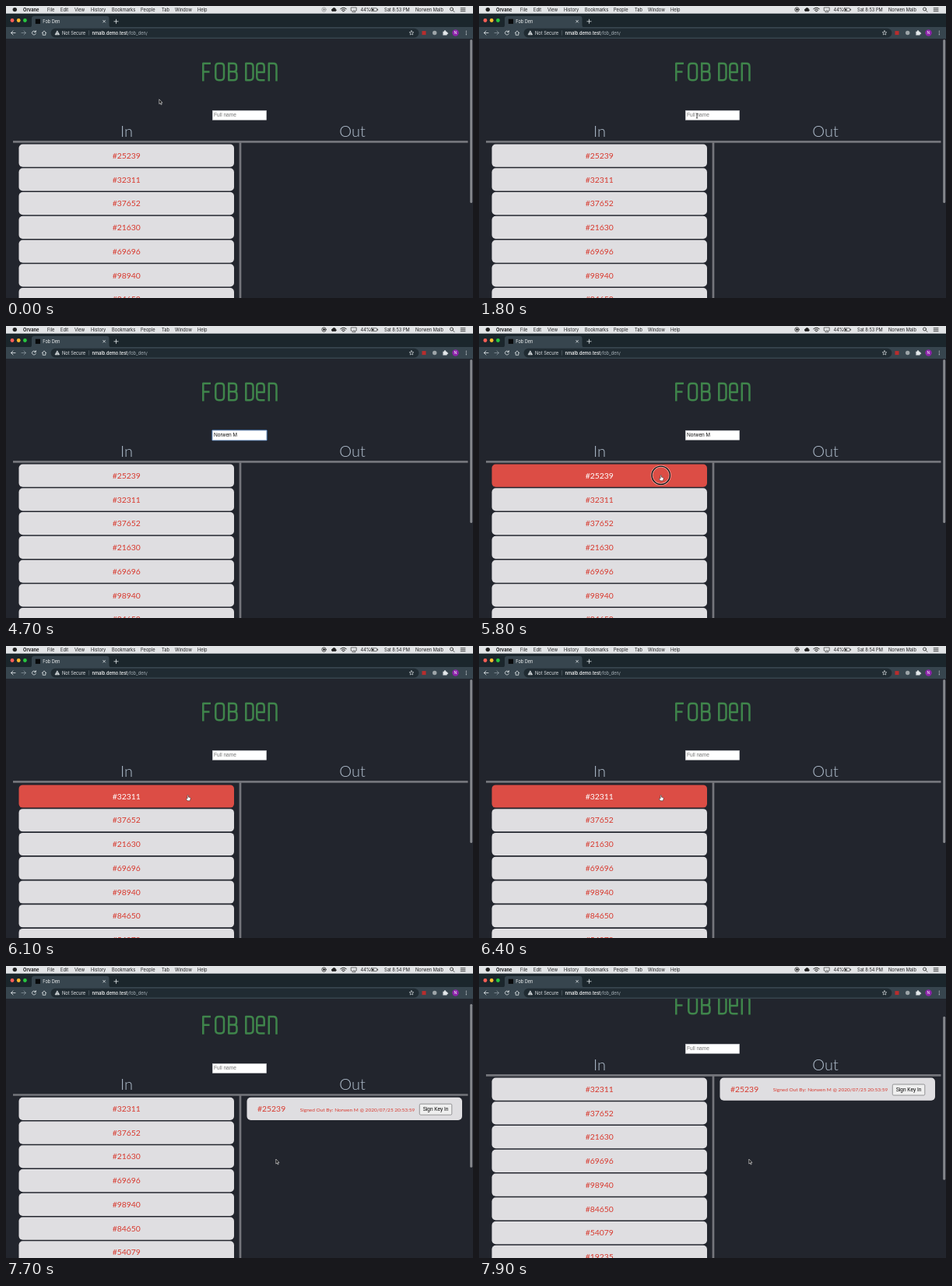
Recreate the animation shown at these times as an HTML page. Size 600 by 375 pixels, loop 8000 ms.

```html
<!DOCTYPE html>
<html lang="en">
<head>
<meta charset="utf-8">
<title>Fob Den</title>
<style>
html, body { margin: 0; width: 100%; height: 100%; overflow: hidden; background: #22252d; }
svg { display: block; width: 100vw; height: 100vh; }
text { white-space: pre; }
.ui { font: 5.7px Inter, sans-serif; }
.lato { font-family: Lato, sans-serif; }
.form { font-family: "Liberation Sans", Arial, sans-serif; }
.key { font-size: 10.4px; fill: #d8392e; }
.line { fill: none; stroke: currentColor; stroke-linecap: round; stroke-linejoin: round; }
</style>
</head>
<body>
<svg viewBox="0 0 600 375" xmlns="http://www.w3.org/2000/svg">
  <defs><clipPath id="view"><rect y="42" width="600" height="333"/></clipPath></defs>
  <rect width="600" height="375" fill="#22252d"/>

  <g clip-path="url(#view)">
    <g id="page">
      <g role="img" aria-label="Fob Den" class="line" color="#3f854b" stroke-width="2.5" style="stroke-linecap:butt">
        <path d="M253.3 96.5V73.8H263M253.3 84.5H261.5"/>
        <path d="M269.3 78Q269.3 73.8 273.3 73.8H276Q280 73.8 280 78V91Q280 95.2 276 95.2H273.3Q269.3 95.2 269.3 91Z"/>
        <path d="M286.3 73.8H292Q296 73.8 296 77.5V81Q296 84.3 292.5 84.3H286.3M292.5 84.3Q296.5 84.3 296.5 88V91.5Q296.5 95.2 292.5 95.2H286.3V72.6"/>
        <path d="M308.3 73.8H313.5Q317.5 73.8 317.5 78V91Q317.5 95.2 313.5 95.2H308.3Z"/>
        <path d="M332.5 95.2H326Q322.3 95.2 322.3 91V78Q322.3 73.8 326 73.8H328Q331.7 73.8 331.7 78V85H322.3"/>
        <path d="M337.8 96.5V73.8H343.5Q347.5 73.8 347.5 78V96.5"/>
      </g>
      <g class="form" font-size="6.6">
        <rect id="focus" x="264.5" y="133.4" width="71" height="13.8" rx="1" fill="#5b9bea"/>
        <rect x="265.3" y="134.2" width="69.4" height="12.2" fill="#fff" stroke="#b9bbc0" stroke-width=".5"/>
        <text id="entry" x="267" y="142.3"></text>
        <rect id="caret" y="136.5" width=".6" height="7.4"/>
      </g>
      <g class="lato" font-size="20" font-weight="300" fill="#b3c1d0" text-anchor="middle">
        <text x="155" y="167.5">In</text><text x="445" y="167.5">Out</text>
      </g>
      <path d="M9 174.3H593.5M301 174V470" stroke="#74757b" stroke-width="2.7"/>
      <g id="cards"></g>
      <g id="out" class="lato">
        <rect x="309.5" y="177.5" width="276.5" height="29.2" rx="5" fill="#dfdee1"/>
        <text class="key" x="323" y="195.8">#25239</text>
        <text x="451.5" y="195.4" font-size="6.5" fill="#d8392e" text-anchor="middle">Signed Out By: Norwen M @ 2020/07/25 20:53:59</text>
        <rect x="531.3" y="186" width="41.5" height="14" rx="1.5" fill="#efefef" stroke="#6f6f72" stroke-width=".7"/>
        <text class="form" x="552" y="195.3" font-size="6.4" text-anchor="middle">Sign Key In</text>
      </g>
    </g>
    <rect id="thumb" x="596.2" y="43" width="3" height="210" rx="1.5" fill="#85878c"/>
  </g>

  <g class="ui">
    <rect width="600" height="10" fill="#e2e4e6"/>
    <circle cx="11.3" cy="4.6" r="2.7" fill="#222"/>
    <g id="menu" fill="#1c1c1e"></g>
    <g class="line" color="#222" stroke-width=".8">
      <g id="record"><circle cx="408.5" cy="4.6" r="2.7"/><circle cx="408.5" cy="4.6" r="1" fill="currentColor"/></g>
      <path d="M419.3 6.5H423.6A1.4 1.4 0 0 0 423.6 4.2A2.2 2.2 0 0 0 419.5 3.8A1.4 1.4 0 0 0 419.3 6.5Z" fill="currentColor"/>
      <path d="M429.8 3.7Q433.5 .7 437.2 3.7M431.2 5.2Q433.5 3.3 435.8 5.2M432.7 6.7H434.3" stroke-width="1"/>
      <path d="M444.5 6H443.2V2H450.2V6H448.9M446.7 5.6L444.8 7.8H448.6Z" stroke-width=".6"/>
      <rect x="468.8" y="2.8" width="7.8" height="3.8" rx=".8" stroke-width=".6"/>
      <path d="M470 4.7H472.5" stroke-width="2" stroke-linecap="butt"/>
      <path d="M477.6 4.2V5.2"/>
      <circle cx="572.5" cy="4" r="2"/><path d="M574 5.5L576 7.5"/>
      <path d="M584.2 2.7H590M584.2 4.7H590M584.2 6.7H590"/>
    </g>

    <rect y="9.7" width="600" height="18" fill="#1b262c"/>
    <circle cx="8" cy="18.5" r="2.4" fill="#ff5f57"/>
    <circle cx="16.2" cy="18.5" r="2.4" fill="#febc2e"/>
    <circle cx="24.4" cy="18.5" r="2.4" fill="#28c840"/>
    <path d="M30 27.5Q33 27.5 33 24.5V16Q33 13 36 13H129.500Q132.500 13 132.500 16V24.500Q132.500 27.500 135.500 27.500Z" fill="#37454e"/>
    <rect x="37.8" y="16.7" width="6.2" height="6.2" fill="#08090a"/>
    <text x="47.3" y="21.9" fill="#f2f4f5" font-size="5.6">Fob Den</text>
    <rect y="27" width="600" height="15" fill="#37454e"/>
    <rect x="57.500" y="28.700" width="473" height="11.700" rx="5.850" fill="#202b32"/>
    <g class="line" color="#e3e7ea" stroke-width=".8">
      <path d="M124.7 18.300L127.500 21.100M127.500 18.300L124.700 21.100M138.900 19.800H144.100M141.500 17.200V22.400"/>
      <path d="M12 34.500H6.500M9 32L6.500 34.500L9 37"/>
      <path d="M20 34.500H25.500M23 32L25.500 34.500L23 37" color="#87939b"/>
      <path d="M38 33A2.500 2.500 0 1 0 38.300 35.500M38.400 31.600V33.500H36.500"/>
      <path d="M46.200 34.700L49 31.900L51.800 34.700M47.200 34.500V37.300H50.800V34.500"/>
      <path d="M66 32.200L68.500 36.800H63.500Z" fill="currentColor"/>
      <path d="M66 33.800V35.200M66 36.300V36.400" stroke="#202b32" stroke-width=".6"/>
      <path d="M106.500 31.800V37.200" stroke="#6b777f" stroke-width=".5"/>
      <path id="star" stroke-width=".6"/>
      <path d="M561.700 33H563.100A1 1 0 1 1 564.900 33H566.300V34.300A1 1 0 1 1 566.300 36V37.300H561.700Z" fill="currentColor" stroke-width=".4"/>
      <path d="M591.300 32.300V32.350M591.300 34.500V34.550M591.300 36.700V36.750" stroke-width="1.200"/>
    </g>
    <text x="72" y="36.600" fill="#e3e7ea">Not Secure</text>
    <text x="110.500" y="36.600" fill="#fff" font-weight="500">nmalb.demo.test<tspan fill="#a6b0b7" font-weight="400">/fob_den/</tspan></text>
    <rect x="534.500" y="32.100" width="5" height="5" fill="#b92d2d"/>
    <circle cx="550.700" cy="34.500" r="2.700" fill="#9da4a8"/>
    <circle cx="577.500" cy="34.500" r="4.200" fill="#8d24aa"/>
    <text x="577.500" y="36.300" fill="#fff" font-size="5" text-anchor="middle">N</text>
  </g>

  <g id="press" fill="none">
    <circle r="11.7" stroke="#fff" stroke-opacity=".55" stroke-width="2.8"/>
    <circle r="11.7" stroke="#111" stroke-width="1.4"/>
  </g>
  <g id="pointer" stroke-linejoin="round">
    <path id="arrow" d="M0 0V6L1.400 4.800L2.400 7L3.400 6.500L2.400 4.400H4.200Z" fill="#111" stroke="#eee" stroke-width=".6"/>
    <path id="beam" d="M-1.200 -3.200Q0 -3.200 0 -2.400V2.400Q0 3.200 -1.200 3.200M1.200 -3.200Q0 -3.200 0 -2.400M0 2.400Q0 3.200 1.200 3.200" fill="none" stroke="#111" stroke-width=".7"/>
    <path id="hand" d="M-.6 0Q0 -.6 .6 0V2.200L3 2.900Q3.700 3.200 3.400 4.300L2.700 7H-.6L-2.400 4.400Q-2.200 3.500 -.6 4.200Z" fill="#fff" stroke="#222" stroke-width=".5"/>
  </g>
</svg>
<script>
const LOOP = 8000, STEP = 100;
const NAME = 'Norwen M';
const KEYS = [25239, 32311, 37652, 21630, 69696, 98940, 84650, 54079, 19235];
const CARD = { left: 16.5, top: 177.5, width: 276.5, height: 29.2, pitch: 30.75 };
const T = { click: 2100, type: 2700, perKey: 220, wake: 4800, press: 5700, sign: 6000, out: 6500, scroll: 7600 };
// time, x, y of the pointer's resting points
const PATH = [[0, 196.8, 119.8], [700, 196.8, 119.8], [1500, 280, 141], [4800, 280, 141],
  [5400, 233.7, 191.8], [6700, 233.7, 191.8], [7200, 346.8, 248], [LOOP, 346.8, 248]];

const $ = id => document.getElementById(id);
const show = (id, on) => $(id).setAttribute('display', on ? 'inline' : 'none');
const move = (id, x, y) => $(id).setAttribute('transform', `translate(${x} ${y})`);
const clamp = v => Math.max(0, Math.min(1, v));
const smooth = v => v * v * (3 - 2 * v);

const MENU = [[53, 'File'], [70, 'Edit'], [88, 'View'], [109, 'History'], [136, 'Bookmarks'], [173, 'People'],
  [200, 'Tab'], [217, 'Window'], [246, 'Help'], [455.5, '44%'], [526, 'Norwen Malb']];
$('menu').innerHTML = '<text x="22" y="6.8" font-weight="700">Orvane</text><text id="clock" x="486" y="6.8"></text>' +
  MENU.map(([x, label]) => `<text x="${x}" y="6.8">${label}</text>`).join('');

$('star').setAttribute('d', 'M' + Array.from({ length: 10 }, (_, i) => {
  const r = i % 2 ? 1.3 : 3, a = i * Math.PI / 5;
  return `${521 + r * Math.sin(a)} ${34.6 - r * Math.cos(a)}`;
}).join('L') + 'Z');

$('cards').innerHTML = KEYS.map(() =>
  `<g class="lato"><rect width="${CARD.width}" height="${CARD.height}" rx="5"/>` +
  `<text class="key" x="${CARD.width / 2}" y="18.3" text-anchor="middle"></text></g>`).join('');
const cards = [...$('cards').children];

function pointerAt(t) {
  const i = PATH.findIndex((p, n) => n && t <= p[0]);
  const [t0, x0, y0] = PATH[i - 1], [t1, x1, y1] = PATH[i];
  const k = smooth((t - t0) / (t1 - t0));
  return [x0 + (x1 - x0) * k, y0 + (y1 - y0) * k];
}

function drawCards(keys, top, [px, py]) {
  let hovered = false;
  cards.forEach((card, i) => {
    const y = top + i * CARD.pitch;
    const over = px > CARD.left && px < CARD.left + CARD.width && py > y && py < y + CARD.height;
    const [box, label] = card.children;
    card.setAttribute('transform', `translate(${CARD.left} ${y})`);
    card.setAttribute('display', i < keys.length ? 'inline' : 'none');
    box.setAttribute('fill', over ? '#dc4d45' : '#dfdee1');
    label.style.fill = over ? '#fff' : '';
    label.textContent = '#' + keys[i];
    hovered = hovered || over;
  });
  return hovered;
}

function drawEntry(t) {
  const typed = t < T.type || t >= T.sign ? '' : NAME.slice(0, Math.floor((t - T.type) / T.perKey) + 1);
  const focused = t >= T.click && t < T.press;
  const entry = $('entry');
  entry.textContent = typed || 'Full name';
  entry.setAttribute('fill', typed ? '#111' : '#757575');
  show('focus', focused);
  show('caret', focused && Math.floor(t / 500) % 2 === 0);
  $('caret').setAttribute('x', 267 + (typed ? entry.getComputedTextLength() : 0));
}

function render(t) {
  const signed = t >= T.sign, out = t >= T.out;
  const scroll = 34 * smooth(clamp((t - T.scroll) / 300));
  const [x, y] = pointerAt(t);
  const typing = t >= T.type && t < T.wake;

  move('page', 0, -scroll);
  move('thumb', 0, scroll * 0.64);
  drawEntry(t);
  const overCard = drawCards(signed ? KEYS.slice(1) : KEYS, CARD.top + (signed && !out ? 0.9 : 0), [x, y + scroll]);
  const overEntry = x > 265 && x < 335 && y > 134 && y < 147;
  show('out', out);

  $('clock').textContent = signed ? 'Sat 8:54 PM' : 'Sat 8:53 PM';
  $('record').setAttribute('opacity', t < STEP ? 0.4 : 1);

  move('pointer', x, y);
  move('press', x, y);
  show('pointer', !typing);
  show('arrow', !overCard && !overEntry);
  show('beam', overEntry);
  show('hand', overCard);
  show('press', [T.click, T.press].some(at => t >= at && t < at + 200));
}

function tick() {
  render(Math.floor(performance.now() % LOOP / STEP) * STEP);
  requestAnimationFrame(tick);
}
tick();
</script>
</body>
</html>
```
